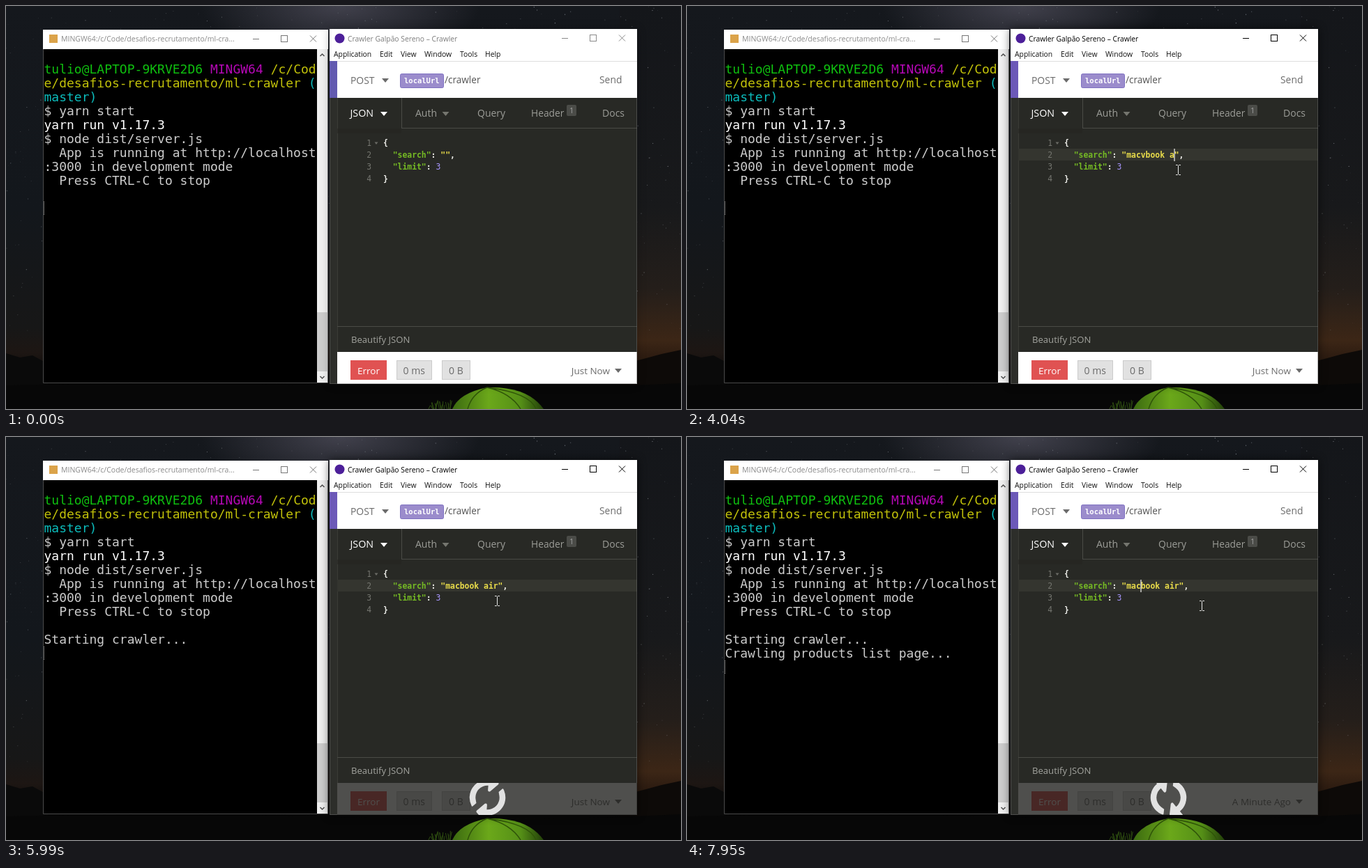
Recreate the animation shown at these times as an HTML page. Size 968x579 px, loop 8 s.

```html
<!DOCTYPE html>
<html lang="en">
<head>
<meta charset="utf-8">
<title>Crawler demo</title>
<style>
  html, body { margin: 0; width: 100%; height: 100%; overflow: hidden; background: #000; }
  svg { display: block; }
  text { white-space: pre; font-family: "Open Sans", sans-serif; }
  .mono { font-family: "DejaVu Sans Mono", monospace; }
</style>
</head>
<body>
<svg id="stage" width="968" height="579" viewBox="0 0 968 579">
  <defs>
    <linearGradient id="sky" x2="0" y2="1">
      <stop offset="0" stop-color="#15181d"/>
      <stop offset=".5" stop-color="#13171c"/>
      <stop offset=".8" stop-color="#171717"/>
      <stop offset=".86" stop-color="#1d1613"/>
      <stop offset=".93" stop-color="#080808"/>
    </linearGradient>
    <linearGradient id="dusk" x2="0" y2="1">
      <stop offset="0" stop-color="#14161a"/>
      <stop offset=".5" stop-color="#18191b"/>
      <stop offset=".7" stop-color="#241e1a"/>
      <stop offset=".83" stop-color="#3c2616"/>
      <stop offset=".88" stop-color="#2a1a10"/>
      <stop offset=".94" stop-color="#0a0807"/>
    </linearGradient>
    <radialGradient id="glow">
      <stop offset="0" stop-color="#4c4b58" stop-opacity=".8"/>
      <stop offset="1" stop-color="#4c4b58" stop-opacity="0"/>
    </radialGradient>
    <linearGradient id="tent" x2="1">
      <stop offset="0" stop-color="#3c6a10"/>
      <stop offset=".4" stop-color="#6ba81a"/>
      <stop offset=".75" stop-color="#558f17"/>
      <stop offset="1" stop-color="#223f09"/>
    </linearGradient>
    <filter id="blur" x="-10%" y="-10%" width="120%" height="120%"><feGaussianBlur stdDeviation="7"/></filter>
    <clipPath id="barClip"><rect x="475" y="497" width="430" height="46"/></clipPath>
  </defs>
  <g id="scene"></g>
</svg>
<script>
const LOOP = 8000;
const CODE_X = 541, CHAR = 6.863;

const rect = (x, y, w, h, fill, more = "") =>
  `<rect x="${x}" y="${y}" width="${w}" height="${h}" fill="${fill}" ${more}/>`;
const text = (x, y, size, fill, str, more = "") =>
  `<text x="${x}" y="${y}" font-size="${size}" fill="${fill}" ${more}>${str}</text>`;
const path = (d, fill, more = "") => `<path d="${d}" fill="${fill}" ${more}/>`;
const span = (fill, str, more = "") => `<tspan fill="${fill}" ${more}>${str}</tspan>`;
const drop = (x, y, fill) => path(`M${x} ${y}h10l-5 6z`, fill);
const mono = (x, y, size, fill, str, more = "") =>
  text(x, y, size, fill, str, `class="mono" ${more}`);

function seeded(seed) {
  return () => (seed = (seed * 16807) % 2147483647) / 2147483647;
}

function background() {
  const rnd = seeded(77);
  let s = rect(0, 0, 968, 579, "url(#sky)") + rect(880, 0, 88, 579, "url(#dusk)");
  s += `<ellipse cx="480" cy="0" rx="200" ry="75" fill="url(#glow)"/>`;
  for (let i = 0; i < 650; i++) {
    const x = rnd() * 968, y = rnd() * 470, r = 0.3 + rnd() * 0.4, o = 0.15 + rnd() * 0.4;
    s += `<circle cx="${x.toFixed(1)}" cy="${y.toFixed(1)}" r="${r.toFixed(2)}" fill="#cfd6e0" opacity="${o.toFixed(2)}"/>`;
  }
  s += path("M0 499L20 505 38 502 60 514V579H0z", "#0a0a0a");
  s += path("M968 494L940 500 918 506 895 512V579H968z", "#0d0a08");
  s += path("M0 545Q240 538 480 546T968 542V579H0z", "#070707");
  for (let i = 0; i < 22; i++) {
    const x = 606 + rnd() * 42, h = 4 + rnd() * 10;
    s += path(`M${x.toFixed(1)} 579l${(rnd() * 6 - 3).toFixed(1)} ${(-h).toFixed(1)}`, "none", 'stroke="#2c4a10"');
  }
  s += path("M640 579Q650 556 690 548Q748 546 771 579z", "url(#tent)");
  s += path("M662 579Q668 557 690 548Q724 556 738 579M690 548Q752 556 760 579", "none", 'stroke="#2f5409" stroke-width="1.5"');
  return s;
}

function controls(x, y, color) {
  return `<g stroke="${color}" fill="none"><path d="M${x} ${y + 0.5}h9M${x + 82} ${y - 4.5}l9 9m0-9l-9 9"/>` +
    `<rect x="${x + 40.5}" y="${y - 4.5}" width="9" height="9"/></g>`;
}

function terminal() {
  const grey = "#cccccc";
  const rows = [
    span("#0fc00f", "tulio@LAPTOP-9KRVE2D6 ") + span("#b608b6", "MINGW64 ") + span("#c1c10a", "/c/Cod"),
    span("#c1c10a", "e/desafios-recrutamento/ml-crawler ") + span("#0cbcbc", "("),
    span("#0cbcbc", "master)"),
    "$ yarn start",
    span("#fff", "yarn run v1.17.3"),
    "$ node dist/server.js",
    "  App is running at http://localhost",
    ":3000 in development mode",
    "  Press CTRL-C to stop"
  ];
  return rect(53, 34, 409, 508, "#000") + rect(53, 34, 409, 28, "#fff") +
    rect(62, 41, 12, 12, "#dba34a") +
    text(79, 51, 10.5, "#8a8a8a", "MINGW64:/c/Code/desafios-recrutamento/ml-cra...") +
    controls(354, 47, "#777") +
    rows.map((r, i) => mono(54.5, 97 + i * 20, 18, grey, r)).join("") +
    mono(54.5, 297, 18, grey, "Starting crawler...", 'id="log1"') +
    mono(54.5, 317, 18, grey, "Crawling products list page...", 'id="log2"') +
    `<path id="prompt" d="M54.5 0v20" stroke="#aaa" stroke-dasharray="1 1"/>` +
    rect(446, 62, 15.5, 479, "#f0f0f0") + rect(446, 440, 15.5, 85, "#cdcdcd") +
    `<path d="M450.5 72l3-3 3 3M450.5 532l3 3 3-3" fill="none" stroke="#505050" stroke-width="1.5"/>` +
    path("M53.5 62V541.5H461.5V62", "none", 'stroke="#6a6a6a" stroke-opacity=".7"');
}

function editor() {
  const green = "#75ba24", yellow = "#e9dc4a", light = "#eeeeea", bold = 'font-weight="bold"';
  const numbers = [1, 2, 3, 4].map((n, i) =>
    mono(524, 201 + i * 17.1, 11.4, "#74756f", n, 'text-anchor="end"')).join("");
  const inner = CODE_X + 2 * CHAR;
  return rect(475, 205, 430, 17, "#34352f", 'id="line"') + numbers +
    path("M528.5 195.5h5l-2.5 3.5z", "#6b6c66") +
    mono(CODE_X, 201, 11.4, light, "{", bold) +
    mono(inner, 218, 11.4, light, span(green, '"search"') + ": " + span(yellow, '""', 'id="query"') + ",", bold) +
    mono(inner, 235.2, 11.4, light, span(green, '"limit"') + ": " + span("#a896ff", "3", 'font-weight="normal"'), bold) +
    mono(CODE_X, 252.5, 11.4, light, "}", bold) +
    rect(0, 205, 1.2, 18, "#f4f4f0", 'id="caret"');
}

function client() {
  const tab = "#9c9d98", dim = "#6b6b6b", edge = "#4a4b46";
  const menu = [[470, "Application"], [536, "Edit"], [566, "View"], [600, "Window"], [651, "Tools"], [687, "Help"]];
  return rect(464, 33, 441, 510, "#000", 'id="shadow" filter="url(#blur)"') +
    rect(464, 33, 441, 510, "#282925") + rect(464, 33, 441, 99, "#fff") +
    rect(464, 132, 11, 411, "#2d2e2a") + rect(464, 79, 11, 53, "#6a58b6", 'id="strip"') +
    `<circle cx="478.5" cy="46.5" r="7" fill="#4c1f99"/>` +
    text(490, 50.5, 10.3, "#000", "Crawler Galpão Sereno – Crawler", 'id="title"') +
    `<g id="btnOff">${controls(797, 46, "#8a8a8a")}</g><g id="btnOn">${controls(797, 46, "#000")}</g>` +
    menu.map(([x, s]) => text(x, 73, 10.4, "#111", s)).join("") +
    rect(475, 79, 430, 1, "#dedede") +
    text(494, 112, 13.9, dim, "POST") + drop(539, 104, dim) +
    rect(565.5, 97.5, 62, 20, "#9b8ccc", 'rx="2" stroke="#7f71c2"') +
    mono(571, 111, 10.5, "#fff", "localUrl", 'font-weight="bold"') +
    text(629, 111, 13.6, "#555", "/crawler") + text(851, 111, 13.9, dim, "Send") +
    rect(475, 132, 1, 365, "#3a3b36") + rect(567, 132, 1, 44, edge) + rect(567, 175, 338, 1, edge) +
    rect(475, 176, 92, 7, "#242521", 'opacity=".5"') +
    text(493.5, 159, 14.3, "#fff", "JSON") + drop(537, 152, "#fff") +
    text(587, 159, 14, tab, "Auth") + drop(625.5, 152, "#75766f") +
    text(676, 159, 14, tab, "Query") + text(753, 159, 13.8, tab, "Header") +
    rect(804, 142, 14, 16, "#4b4c48", 'rx="2"') + text(811, 154, 10, "#aaa", "1", 'text-anchor="middle"') +
    text(855, 159, 14, tab, "Docs") +
    editor() +
    rect(475, 460, 430, 1, edge) + text(495, 484, 13.1, "#a3a49f", "Beautify JSON") +
    rect(475, 497, 430, 46, "#fff") +
    rect(494, 509, 52, 28, "#e05252") + text(504, 529, 13.5, "#fff", "Error") +
    rect(560.5, 509.5, 50, 27, "#e1e1e1", 'stroke="#cbcbcb"') + text(569.5, 529, 14, dim, "0 ms") +
    rect(625.5, 509.5, 40, 27, "#e1e1e1", 'stroke="#cbcbcb"') + text(635, 529, 14, dim, "0 B") +
    text(866, 528.5, 13.5, dim, "Just Now", 'id="age" text-anchor="end"') + drop(873, 521, dim) +
    path("M464.5 132V542.5H904.5V132", "none", 'stroke="#777" stroke-opacity=".45"');
}

function spinner() {
  const half = "M-25.2-5.4A25.7 25.7 0 0 1 17.7-18.6L22-23Q25.7-24.5 25.7-21.4V-6.4Q25.7-4.3 23.6-4.3" +
    "H8.6Q5.5-5.5 7.4-7.8L12-12.4A17.1 17.1 0 0 0-14.6-9L-17.4-4.3H-24.2Q-25.3-4.4-25.2-5.4z";
  return `<g id="overlay" clip-path="url(#barClip)">${rect(475, 497, 430, 46, "#1a1a18", 'opacity=".77"')}` +
    `<g id="spin" fill="#e2e2e2"><path d="${half}"/><path d="${half}" transform="rotate(180)"/></g></g>`;
}

function pointers() {
  return `<g id="arrow">${path("M0 0V16.5L3.8 13 6.4 18.8 9 17.6 6.4 12H11.6z", "#fff", 'stroke="#000" stroke-width=".9"')}</g>` +
    `<path id="beam" d="M-3.5-7h2.5l1 1 1-1h2.5M-3.5 7h2.5l1-1 1 1h2.5M0-6v12" fill="none" stroke="#e8e8e8"/>`;
}

document.getElementById("scene").innerHTML =
  background() + terminal() + client() + spinner() + pointers();

const $ = {};
document.querySelectorAll("#scene [id]").forEach(el => $[el.id] = el);
const show = (el, on) => el.setAttribute("visibility", on ? "visible" : "hidden");
const move = (el, x, y, extra = "") => el.setAttribute("transform", `translate(${x} ${y}) ${extra}`);

const KEYS = [2790, 2890, 3000, 3110, 3330, 3500, 3590, 3680, 3760, 4040, 4090, 4140];
const TYPED = "macvbook air", FIXED = "macbook air";
const SEND = 5440;

// Time, x, y; the pointer eases from one stop to the next.
const STOPS = [[790, 840, 536], [1430, 634, 212], [1880, 634, 212], [2070, 704, 235], [6030, 704, 235], [6210, 738, 242]];

function pointerAt(t) {
  let i = STOPS.length - 1;
  while (i > 0 && t < STOPS[i][0]) i--;
  const a = STOPS[i], b = STOPS[i + 1] || a;
  const u = b === a ? 0 : Math.max(0, (t - a[0]) / (b[0] - a[0]));
  const e = u * u * (3 - 2 * u);
  return [a[1] + (b[1] - a[1]) * e, a[2] + (b[2] - a[2]) * e];
}

function caretOn(t) {
  if (t < 1750 || (t >= 2460 && t < 2790) || (t >= 4530 && t < 4790)) return false;
  return t < 5745 || (t - 5745) % 760 >= 380;
}

function update(t) {
  const focus = t >= 1690;
  $.title.setAttribute("fill", focus ? "#000" : "#7c7c7c");
  $.strip.setAttribute("fill", focus ? "#6c59b8" : "#625ab0");
  $.shadow.setAttribute("opacity", focus ? 0.6 : 0.25);
  show($.btnOn, focus);
  show($.btnOff, !focus);
  show($.line, t >= 1750);

  const count = KEYS.filter(k => t >= k).length;
  $.query.textContent = `"${t < 5180 ? TYPED.slice(0, count) : FIXED}"`;
  const col = t < 4790 ? 13 + count : t < 4910 ? 22 : t < 5180 ? 17 : 16;
  $.caret.setAttribute("x", CODE_X + col * CHAR - 0.4);
  show($.caret, caretOn(t));

  const log1 = t >= 5550, log2 = t >= 7560;
  show($.log1, log1);
  show($.log2, log2);
  move($.prompt, 0, 281 + 20 * (log1 + log2));
  $.age.textContent = t >= 7500 ? "A Minute Ago" : "Just Now";

  show($.overlay, t >= SEND);
  $.overlay.setAttribute("opacity", Math.min(1, Math.max(0, (t - SEND + 55) / 110)));
  move($.spin, 690.5, 518, `rotate(${(t - SEND) * 360 / 1420})`);

  const [x, y] = pointerAt(t);
  move($.arrow, x, y);
  move($.beam, Math.round(x) + 0.5, Math.round(y) + 0.5);
  show($.arrow, t >= 820 && y >= 460);
  show($.beam, t >= 820 && y < 460);
}

const start = performance.now();
function tick() {
  update((performance.now() - start) % LOOP);
  requestAnimationFrame(tick);
}
tick();
</script>
</body>
</html>
```
